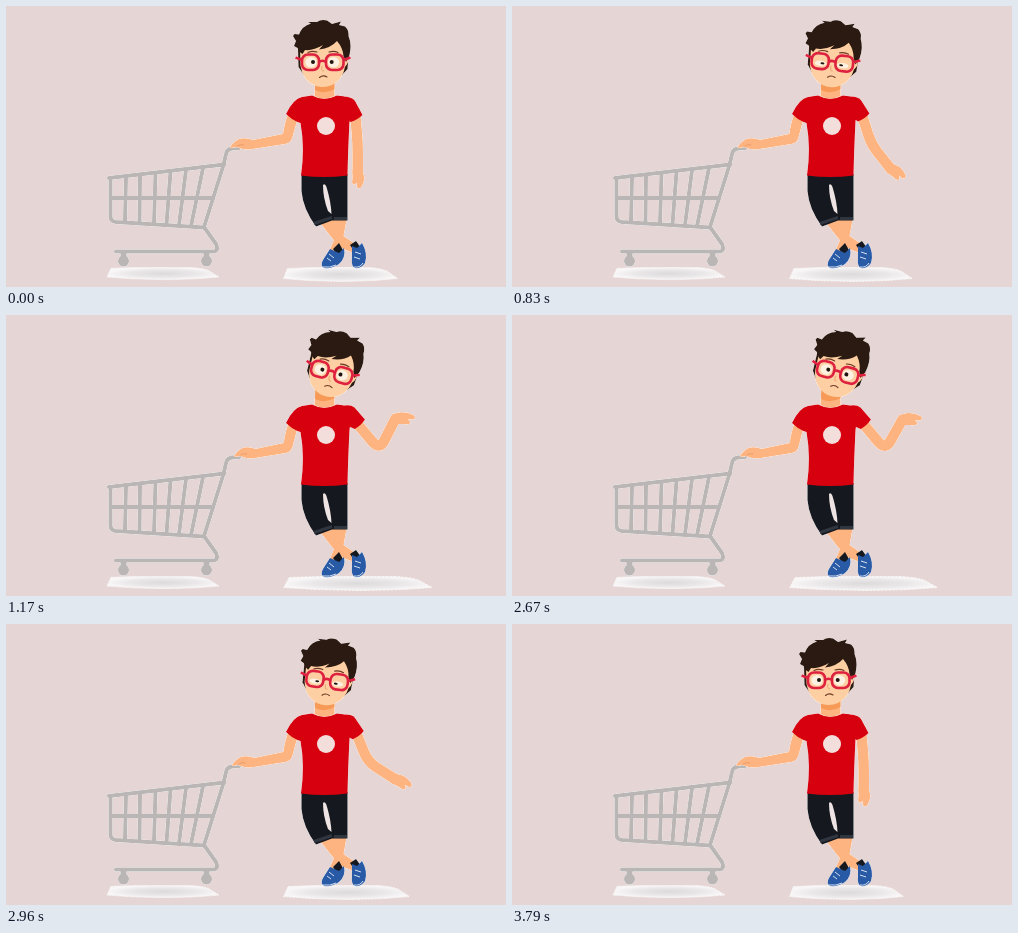
These frames come from a looping animation (500 by 281 pixels, 3830 ms). An HTML page:

```html
<!DOCTYPE html>
<html lang="en">
<head>
<meta charset="utf-8">
<title>Shopper with empty cart</title>
<style>
  html, body { margin: 0; width: 100%; height: 100%; overflow: hidden; background: #e5d5d5; }
  svg { display: block; width: 100%; height: 100%; }
  .halo { filter: drop-shadow(0 0 .7px #fff) drop-shadow(0 0 .5px #fff); }
  .cart { fill: none; stroke: #b9b6b5; stroke-width: 4; stroke-linejoin: round; stroke-linecap: round; }
  .skin { fill: #fdb481; }
  .limb { fill: none; stroke: #fdb481; stroke-width: 10.5; stroke-linecap: round; }
  .shirt { fill: #d6000f; }
  .shorts { fill: #15181f; }
  .shoe { fill: #285aa6; }
  .hair { fill: #2b1a11; }
  .glasses { fill: none; stroke: #dd213f; stroke-width: 2.6; }
  .line { fill: none; stroke: #6b3a26; stroke-width: 1.1; stroke-linecap: round; }
</style>
</head>
<body>
<svg viewBox="0 0 500 281" preserveAspectRatio="none">
  <defs>
    <radialGradient id="ground">
      <stop offset="0" stop-color="#dcdada"/>
      <stop offset=".6" stop-color="#e9e7e7"/>
      <stop offset="1" stop-color="#f8f6f6"/>
    </radialGradient>
    <path id="patch" d="M4 1 L30 0 H86 Q100 1 105 4 L115 11 L92 13 L60 14 L25 13 L0 11Z"
      fill="url(#ground)" stroke="#f8f5f5" stroke-width="1" stroke-dasharray="2 1"/>
  </defs>

  <use href="#patch" transform="translate(101 261.5) scale(.974 .87)"/>
  <use href="#patch" id="shadow"/>

  <g class="halo">
    <g class="cart">
      <path d="M233 142 L226 142.500 Q221 143 220 148 L217.500 159 L198 221 L210 238 Q213 245.500 207 245.500 H110"/>
      <path d="M103 172 L218 158.500 M104.500 172 V211 Q105 215.500 110 216 L198 221.500"/>
      <path d="M105 192 H207 M120 171 L119 215 M134 169 L133.500 216
        M149.500 167 L148 217 M164.500 166 L160.500 218 M180 164 L173 219 M197 162 L185 220"/>
    </g>
    <g fill="#b9b6b5"><circle cx="117.500" cy="255" r="5.500"/><circle cx="200.500" cy="255" r="5.500"/>
      <path d="M114.500 246 h6 v8 h-6z M197.500 246 h6 v8 h-6z"/></g>
  </g>

  <g class="halo">
    <path class="skin" d="M328 212 L341 211 L337 233 L332 247 L322 248 L328 234Z"/>
    <path class="skin" d="M312 214 L327 210 L336 229 L352 240 L348 247 L335 242 L326 232Z"/>
    <path class="shorts" d="M327 243 L333 237 L338 246 L332 250Z M344 239 L350 235 L355 242 L348 245Z"/>
    <path class="shoe" d="M324 243 L333 247 L338 242 Q340 252 333 258 Q326 263 318 262 Q314 259 317 254Z"/>
    <path class="shoe" d="M346 240 L351 242 L356 237 Q362 247 359 257 Q355 263 349 262 Q345 260 346 252Z"/>
    <path d="M323 248 l5 4 M321 252 l4 3 M349 246 l6 2 M348 251 l6 2 M317 261 q7 1 13 -2 M348 261 q6 1 9 -4"
      fill="none" stroke="#e7eef8" stroke-width=".9"/>
    <path class="shorts" d="M295.500 168 H341.500 L341.500 214.500 L326 214.500 L310 220.500 Q297 203 295.500 185Z"/>
    <path d="M317 179 Q319 177 320.500 181 Q325 196 325.500 208 L322 205 Q317 192 317 179Z" fill="#eee4e4"/>
    <path d="M308 217.500 L326 211.500 M328 212.500 H341" stroke="#2f3640" stroke-width="3"/>

    <g id="restingArm">
      <path class="skin" d="M283 105 Q278 119 277 128 L247 134 Q239 131 232 133.500 Q225 138 224 142
        L231 141 Q235 143 243 143.500 L279 138 Q285 137 286.500 131 L291.500 113Z"/>
      <path d="M231 140 Q234 138 238 139" fill="none" stroke="#e99663" stroke-width=".8"/>
    </g>

    <path id="arm" class="limb"/>
    <path id="hand" class="skin" d="M-5 -3 Q0 -5 5 -2 L6.500 5 Q6 12 2.500 16.500 Q-.5 18.500 -1.500 14.500
      L-1 11 L-4 13 Q-7 12 -5.500 7Z"/>

    <path id="sleeve" class="shirt" d="M330 91 Q345 89 349 95 L356.500 109 Q352 113.500 344.500 116 L336 110Z"/>
    <path class="shirt" d="M306 89.500 Q318 96 331 89.500 Q343 90.500 346 96 L343.500 115 Q342 145 341.500 169.500
      Q318 172.500 295 169.500 Q299 142 294.500 117 L291.500 116 Q285 113 280 108 Q287 93 296 91Z"/>
    <circle cx="320" cy="120" r="9" fill="#f4dedb"/>

    <path class="skin" d="M309.500 72 H328 L328.500 90 Q318 95 308.500 90Z"/>
    <path fill="#f79a57" d="M309.500 74 H328.500 V83 Q319 89 309 84Z"/>
    <g id="head">
      <path class="hair" d="M292 42 L292.500 61 L298 69 L336 69 L341.500 63 L343 42Z"/>
      <path fill="#fdcfa2" d="M294 42 L294.500 60 Q297 75 310 80 Q318 82.500 326 79 Q337 73 339 61
        Q344 56 341 50 L335 31 L300 34Z"/>
      <path class="hair" d="M296.500 48 Q293 46 291.500 42 L288 40 L290 35 L287 30 L288.500 28 L293 28.500
        Q296 20 305 17.500 L302 16 L311 16 Q315 13 321 14.500 L326 18 L335 15.500 L333 19 L339 20.500
        Q343 24 342.500 30 Q346 38 343.500 49 L340 56 L337.500 50 Q337 42 331 35 Q325 42 313 43.500
        L317 39 Q307 45 299 44Z"/>
      <path class="line" d="M302 46.500 Q306 44.500 311 46 M323 46 Q328 44.500 332 46.500"/>
      <g id="eyes">
        <ellipse cx="305" cy="56.300" rx="5.700" ry="5.200" fill="#fff1e2"/>
        <ellipse cx="327.500" cy="56.300" rx="5.700" ry="5.200" fill="#fff1e2"/>
        <circle cx="307" cy="56" r="2" fill="#21150f"/>
        <circle cx="325.700" cy="56" r="2" fill="#21150f"/>
      </g>
      <g class="glasses">
        <rect x="296" y="48.500" width="17" height="15.500" rx="6"/>
        <rect x="320" y="48.500" width="17.500" height="15.500" rx="6"/>
        <path d="M313 56 Q316.500 53.500 320 56 M296 54 L289.500 51.500 M337.500 54 L344.500 51.500"/>
      </g>
      <path d="M316 60 Q314.500 65 318 65" fill="none" stroke="#eda574" stroke-width="1"/>
      <path class="line" d="M313.500 71.500 Q317 68.500 321 71"/>
    </g>
  </g>
</svg>
<script>
  const LOOP = 3830;
  const SHOULDER = [349, 106];
  const part = id => document.getElementById(id);
  const place = (id, transform) => part(id).setAttribute('transform', transform);
  const ramp = (t, start, end) => Math.min(1, Math.max(0, (t - start) / (end - start)));
  const mix = (a, b, k) => a + (b - a) * k;
  const between = (p, q, k) => p.map((value, i) => mix(value, q[i], k));

  // Steps away from a point; 0 degrees is straight down, 90 is to the right.
  function extend([x, y], length, degrees) {
    const angle = degrees * Math.PI / 180;
    return [x + length * Math.sin(angle), y + length * Math.cos(angle)];
  }

  // Weight of the shrug pose: 0 standing, 1 arm raised.
  const shrug = (t, settled) => t < 2000
    ? ramp(t, 540, settled) ** 1.45
    : 1 - ramp(t, 2650, 3150) ** 1.4;

  // The eyes shut just before the shrug and just after it.
  function eyeOpening(t) {
    if (t < 560) return 1 - ramp(t, 20, 540);
    if (t < 2000) return ramp(t, 560, 1090);
    if (t < 3170) return 1 - ramp(t, 2690, 3130) ** 1.4;
    return ramp(t, 3180, 3720);
  }

  function drawArm(reach) {
    const elbow = extend(SHOULDER, mix(31, 38, reach), mix(5, 40, reach));
    const wrist = extend(elbow, mix(30, 35, reach), mix(0, 153, reach ** 1.35));
    const bendIn = between(SHOULDER, elbow, 0.7);
    const bendOut = between(elbow, wrist, 0.3);
    part('arm').setAttribute('d', `M${SHOULDER} L${bendIn} Q${elbow} ${bendOut} L${wrist}`);
    place('hand', `translate(${wrist}) rotate(${-mix(2, 93, Math.sqrt(reach))}) scale(1 ${mix(0.9, 1.15, reach)})`);
  }

  function draw(t) {
    const pose = shrug(t, 1090);
    const reach = shrug(t, 1130);
    drawArm(reach);
    place('head', `rotate(${15 * pose} 317 91)`);
    place('eyes', `translate(0 60.5) scale(1 ${eyeOpening(t)}) translate(0 -60.5)`);
    place('restingArm', `translate(290 0) scale(${1 - 0.06 * pose} 1) translate(-290 0)`);
    place('sleeve', `rotate(${-13 * reach} 338 96)`);
    place('shadow', `translate(${277.5 + pose * 0.5} 261.5) scale(${mix(114, 148, pose ** 1.5) / 115} 1)`);
  }

  function frame() {
    draw(performance.now() % LOOP);
    requestAnimationFrame(frame);
  }
  frame();
</script>
</body>
</html>
```
